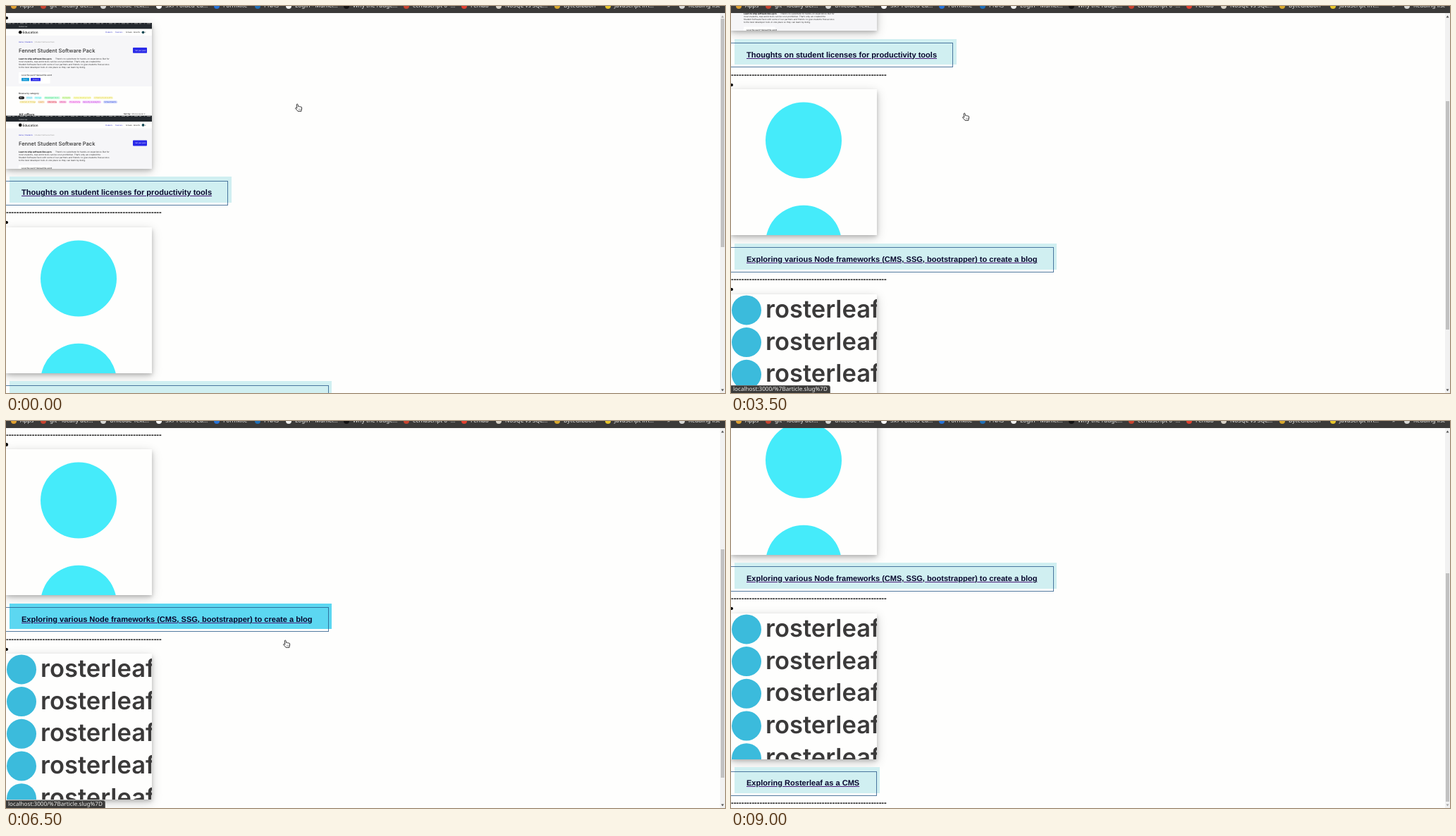
These frames come from a looping animation (1020x549 px, 10 s). An HTML page:

```html
<!DOCTYPE html>
<html lang="en">
<head>
<meta charset="utf-8">
<title>Blog list</title>
<style>
html, body { margin: 0; width: 100%; height: 100%; overflow: hidden; background: #fefefd; }
#stage { position: absolute; left: 0; top: 0; width: 1020px; height: 549px; overflow: hidden;
  background: #fefefd; text-rendering: geometricPrecision; }
#stage div, #stage svg { position: absolute; box-sizing: border-box; white-space: nowrap; }
#page { left: 0; top: 0; width: 1013px; height: 900px; }
.post { left: 0; width: 1013px; height: 290px; font: bold 11.05px/15px "Liberation Sans", Arial, sans-serif; }
.dot { left: -1.6px; top: 14.9px; width: 4.4px; height: 4.4px; border-radius: 50%; background: #000; }
.shot { left: 0; top: 23.7px; width: 207px; height: 207px; overflow: hidden; background: #fefefd;
  box-shadow: 0 2.8px 5.5px rgba(0,0,0,.2), 0 4px 14px rgba(0,0,0,.19); }
.back { left: 5px; top: 242.2px; height: 36.7px; background: #d0eff1; }
.glow { left: 0; top: 0; width: 100%; height: 100%; background: #5cd7f1; }
.frame { left: -3px; top: 247.6px; height: 35.4px; border: 1px solid rgba(35,85,135,.78); }
.title { left: 22px; top: 258px; color: #06062c; text-decoration: underline #4b1a78 1px; }
.dash { left: 0; top: 286.3px; color: #000; }
#bar { left: 0; top: 0; width: 1020px; height: 10px; background: #3b3a39; overflow: hidden; }
#bar div { top: -6px; color: #eeeeec; font: 8.2px/12px "Noto Sans", "Open Sans", sans-serif; }
#bar .icon { top: -4.5px; width: 8.4px; height: 8.4px; border-radius: 50%; }
#track { left: 1013px; top: 10px; width: 7px; height: 539px; background: #f1f1f1; }
#thumb { left: 1014px; width: 5px; height: 324px; background: #c1c1c1; }
#status { left: -1px; top: 538px; width: 142px; height: 12px; padding-left: 3px; background: #3b3a39;
  border: 1px solid #6a6a68; border-radius: 0 3px 0 0; color: #eeeeec;
  font: 8.15px/10.5px "Noto Sans", "Open Sans", sans-serif; }
</style>
</head>
<body>
<div id="stage">
  <div id="page"></div>
  <div id="track"></div>
  <div id="thumb"></div>
  <svg width="1020" height="549">
    <path id="up" d="M1014.5 16.5l2-3 2 3z"/>
    <path id="down" d="M1014.5 543.5l2 3 2-3z"/>
  </svg>
  <div id="status">localhost:3000/%7Barticle.slug%7D</div>
  <div id="bar"></div>
  <svg id="hand" width="12" height="13" viewBox="-6 -6.5 12 13">
    <path d="M-2.7-4.6Q-2.5-5.6-1.6-5.4-.9-5.2-.8-4.3L-.4-1.9Q.4-2.6 1.2-1.7 2.1-2.4 2.8-1.4 4-2 4.5-.6 5 1.4 4 3.4L3.9 4.8H-.9Q-1.6 3.6-3.1 2.3-5 .8-4.3.2-3.5-.4-2.2.7Z"
      fill="#fff" stroke="#222" stroke-width=".9" stroke-linejoin="round"/>
    <path d="M.5 1.2v2M1.9 1.2v2M3.2 1.2v2" stroke="#555" stroke-width=".5"/>
  </svg>
  <svg id="arrow" width="10" height="14" viewBox="-1 -1 10 14">
    <path d="M0 0V9.2L2 7.4 3.8 11.2 5.3 10.5 3.6 6.8H6.2Z" fill="#222" stroke="#fff" stroke-width=".6"/>
  </svg>
</div>
<script>
const $ = id => document.getElementById(id);
const PITCH = 290.2;

const text = (x, y, size, str, fill = '#333', weight = 400) =>
  `<text x="${x}" y="${y}" font-size="${size}" fill="${fill}" font-weight="${weight}">${str}</text>`;
const rect = (x, y, w, h, fill, r = 0) =>
  `<rect x="${x}" y="${y}" width="${w}" height="${h}" fill="${fill}" rx="${r}"/>`;
const disc = (x, y, r, fill) => `<circle cx="${x}" cy="${y}" r="${r}" fill="${fill}"/>`;

// Repeat one tile downwards until the square is full
function tiles(height, tile) {
  let out = '';
  for (let y = 0; y < 207; y += height) out += `<g transform="translate(0 ${y})">${tile}</g>`;
  return `<svg width="207" height="207" font-family="Inter, sans-serif">${out}</svg>`;
}

function pill([label, x, w, hue], y) {
  const dark = label === 'All';
  return rect(x, y - 2, w, 4, dark ? '#222' : `hsl(${hue} 85% 90%)`, 1.8) +
    text(x + 1.5, y + .9, 2.6, label, dark ? '#fff' : `hsl(${hue} 75% 48%)`);
}

const row1 = [['All', 18, 8, 0], ['Cloud', 28, 10, 190], ['Design', 40, 11, 180],
  ['Developer tools', 54, 23, 145], ['Domains', 79, 13, 90], ['Game development', 95, 26, 60],
  ['Infrastructure &amp; APIs', 124, 28, 56]];
const row2 = [['Internet of Things', 19, 23, 50], ['Learn', 45, 10, 35], ['Marketing', 58, 14, 350],
  ['Mobile', 75, 11, 325], ['Productivity', 89, 17, 305], ['Security &amp; analytics', 108, 27, 290],
  ['Virtual Events', 138, 20, 230]];
const intro = ['most students, real world tools can be cost-prohibitive. That’s why we created the',
  'Student Software Pack with some of our partners and friends: to give students free access',
  'to the best developer tools in one place so they can learn by doing.'];

const packTile =
  rect(0, 0, 207, 132, '#fefefd') + rect(0, 18, 207, 72, '#f6f6f8') + rect(0, 0, 207, 8.4, '#24292e') +
  '<path d="M2 .9H205" stroke="#9a9a98" stroke-width=".8" stroke-dasharray="5 2 3 4 1 3"/>' +
  text(18, 6, 2.5, 'Global nav', '#ddd') +
  disc(20.2, 13.3, 2.3, '#111') + text(23.5, 15, 4.6, 'Education', '#222', 500) +
  ['Students', 'Teachers', 'Schools', 'Benefits'].map((s, i) =>
    text([141, 155, 170, 181][i], 14.3, 2.4, s, i < 2 ? '#33c' : '#222')).join('') +
  disc(194.5, 13.3, 1.9, '#164a55') + text(197.3, 14.3, 2.4, '▾') +
  text(18, 28.3, 2.5, 'Home  /  Students', '#33c') + text(40, 28.3, 2.5, '/ Student Software Pack', '#999') +
  text(18, 42, 7.5, 'Fennet Student Software Pack', '#333', 500) +
  rect(180, 35, 20, 7.8, '#2a2ae8', .8) + text(183.2, 39.8, 2.3, 'Get your pack', '#fff') +
  text(18, 52.3, 3, 'Learn to ship software like a pro.', '#111', 700) +
  text(70, 52.3, 3, 'There’s no substitute for hands-on experience. But for') +
  intro.map((s, i) => text(18, 56.4 + i * 4, 3, s)).join('') +
  rect(18, 70, 44.5, 16, '#fff', 1) + text(22, 75.2, 2.8, 'Love the pack? Spread the word', '#222', 500) +
  rect(22, 78, 11, 4.4, '#1499d6', .5) + text(24.5, 81.1, 2.4, 'Post', '#fff') +
  rect(35, 78, 14, 4.4, '#2a2ae8', .5) + text(38, 81.1, 2.4, 'Share it', '#fff') +
  text(18, 101.2, 3, 'Browse by category', '#222', 500) +
  row1.map(p => pill(p, 106.3)).join('') + row2.map(p => pill(p, 112.2)).join('') +
  text(18, 131.6, 5.2, 'All offers', '#222', 600) + text(167, 130.3, 2.7, 'Sort by:', '#222', 600) +
  text(178.5, 130.3, 2.7, 'Most popular ▾', '#555');

const posts = [
  ['Thoughts on student licenses for productivity tools', 314.5, 318, tiles(131.6, packTile)],
  ['Exploring various Node frameworks (CMS, SSG, bootstrapper) to create a blog', 457, 461,
    tiles(146.2, disc(103, 72.6, 54, '#45ebfa'))],
  ['Exploring Rosterleaf as a CMS', 205.5, 210,
    tiles(45.7, disc(22, 22.4, 21, '#3bbbdc') + text(49, 33, 34.5, 'rosterleaf', '#3b3a3a', 600))]
];
$('page').innerHTML = posts.map(([title, backW, frameW, shot], i) => `
  <div class="post" style="top:${i * PITCH}px">
    <div class="dot"></div>
    <div class="shot">${shot}</div>
    <div class="back" style="width:${backW}px"><div class="glow"></div></div>
    <div class="frame" style="width:${frameW}px"></div>
    <div class="title">${title}</div>
    <div class="dash">${'-'.repeat(60)}</div>
  </div>`).join('');

// Bookmarks: icon x, icon colour, label
const marks = [[7, '#e0a030', 'Apps'], [49, '#c9432f', 'git - locally del…'], [134, '#d8d8d6', 'Unicode Text…'],
  [213, '#fff', '5x7 Folded Ca…'], [295, '#2673d9', 'Formkite'], [353, '#1f6fb8', 'PNAS'],
  [397, '#f2f2f0', 'Login - Munici…'], [479, '#111', 'Why the rudge…'], [564, '#c9432f', 'ecmascript 6 -…'],
  [646, '#e2402f', 'Fenlab'], [695, '#d9d3c8', 'NoSQL vs SQL…'], [778, '#d9a82c', 'ByteGibbon'],
  [850, '#e8c52a', 'JavaScript im…'], [955, '#d8d8d6', 'Reading list']];
$('bar').innerHTML = marks.map(([x, c, s]) =>
  `<div class="icon" style="left:${x}px;background:${c}"></div><div style="left:${x + 13}px">${s}</div>`).join('') +
  '<div style="left:938px">»</div>';

// One wheel notch, and the lowest scroll position
const NOTCH = 39.1, END = 331.3;

// Time, scroll, pointer, x, y, status shown, highlight of the three titles
const steps = [
  [0, 0, 'hand', 414.7, 144.5, 0],
  [500, 0, 'hand', 395, 152, 1],
  [1000, 2, 'hand', 375, 160, 1],
  [1500, NOTCH * 3, 'arrow', 356.8, 161.7, 1],
  [2000, NOTCH * 3, 'hand', 230, 146, 1, [.9, 0, 0]],
  [2500, NOTCH * 3, 'hand', 295.5, 153, 1, [1, 0, 0]],
  [3000, 125.5, 'arrow', 331, 152.3, 0],
  [3500, NOTCH * 5, 'hand', 332.5, 157.3, 1],
  [4000, NOTCH * 6, 'hand', 332.8, 157.3, 1],
  [4500, NOTCH * 6, 'hand', 367.7, 265, 1],
  [5000, NOTCH * 6, 'hand', 392.8, 298, 1],
  [5500, NOTCH * 6, 'hand', 395.7, 318.3, 1, [0, 1, 0]],
  [6500, NOTCH * 7, 'hand', 398, 316, 1, [0, 1, 0]],
  [7000, END, 'hand', 400.3, 314.3, 1, [0, 1, 0]],
  [7500, END, 'hand', 280, 439.7, 1, [0, .3, 0]],
  [8000, END, 'hand', 150, 512, 1, [0, 0, 1]],
  [8500, END, 'arrow', 95, 1, 1],
  [9000, END, '', 0, 0, 0]
];
const glows = document.querySelectorAll('.glow');
let shown;

function draw([, scroll, pointer, x, y, status, hot = [0, 0, 0]]) {
  $('page').style.top = -scroll + 'px';
  $('thumb').style.top = 18 + scroll * .599 + 'px';
  $('up').style.fill = scroll ? '#505050' : '#a3a3a3';
  $('down').style.fill = scroll === END ? '#a3a3a3' : '#505050';
  $('status').style.display = status ? 'block' : 'none';
  glows.forEach((g, i) => g.style.opacity = hot[i]);
  for (const id of ['hand', 'arrow']) $(id).style.display = id === pointer ? 'block' : 'none';
  if (!pointer) return;
  const [dx, dy] = pointer === 'hand' ? [6, 6.5] : [1, 1];
  $(pointer).style.left = x - dx + 'px';
  $(pointer).style.top = y - dy + 'px';
}

function tick() {
  const t = performance.now() % 10000;
  const step = steps.findLast(s => s[0] <= t);
  if (step !== shown) draw(shown = step);
  requestAnimationFrame(tick);
}
tick();
</script>
</body>
</html>
```
